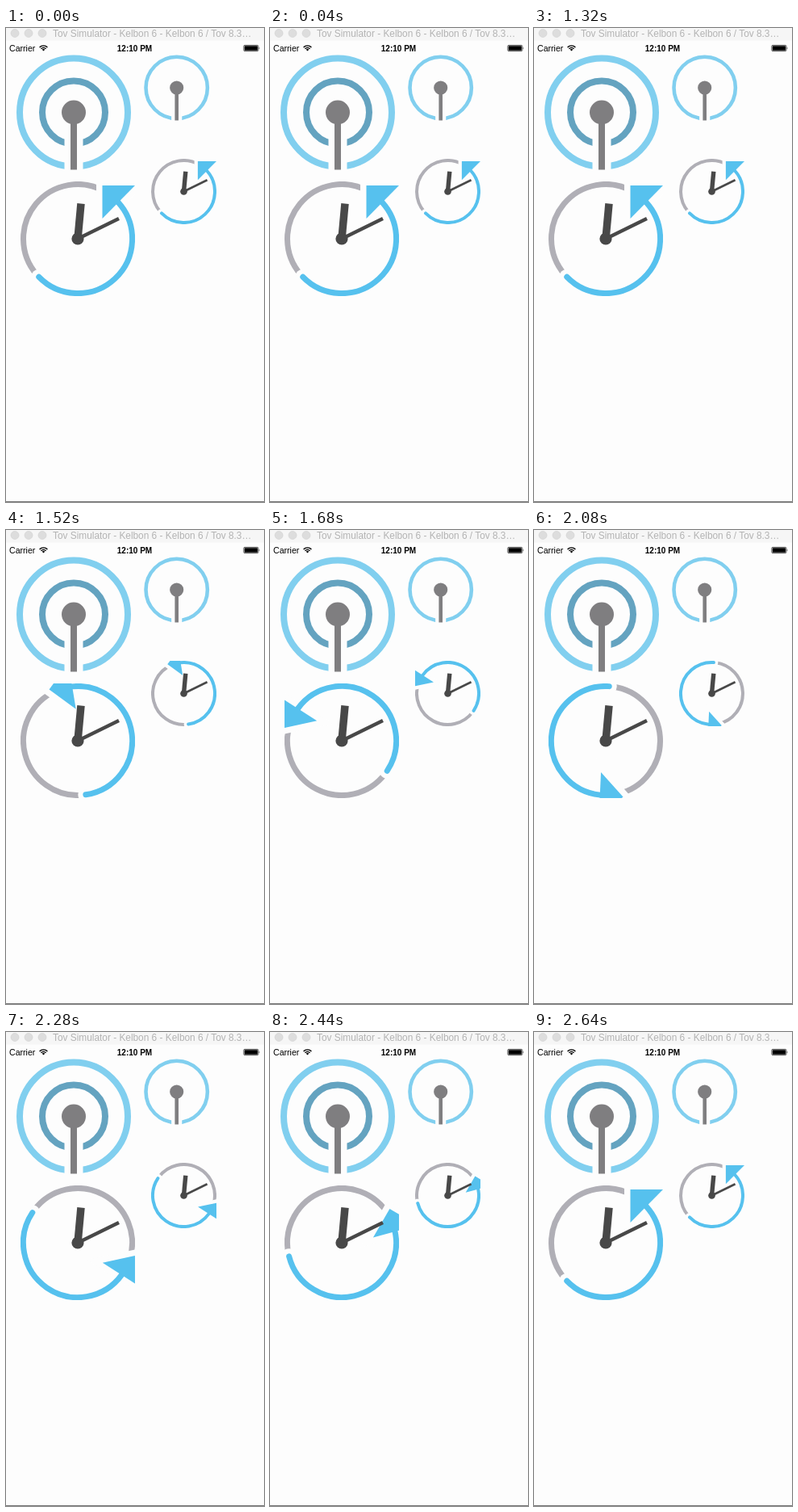
An HTML page for the animation above (2760 ms loop, 320 px wide and 587 px high).

```html
<!DOCTYPE html>
<html lang="en">
<head>
<meta charset="utf-8">
<title>Rotating clock icons</title>
<style>
  html, body { margin: 0; width: 100%; height: 100%; overflow: hidden; background: #fdfdfd; }
  svg { display: block; width: 320px; height: 587px; }
  text { font-family: "Liberation Sans", Arial, sans-serif; }
</style>
</head>
<body>
<svg id="stage" viewBox="0 0 320 587" xmlns="http://www.w3.org/2000/svg"></svg>
<script>
const LOOP = 2760, STEP = 40, START = 1340, SPIN = 1200;
const PAPER = '#fdfdfd', BLUE = '#56c1ee', GRAY = '#b0afb6', DARK = '#484848', STICK = '#7f7e80';
const stage = document.getElementById('stage');

const polar = (r, deg) => {
  const a = deg * Math.PI / 180;
  return [r * Math.cos(a), r * Math.sin(a)].map(v => v.toFixed(2)).join(' ');
};
const arc = (r, from, to) =>
  `M${polar(r, from)} A${r} ${r} 0 ${to - from > 180 ? 1 : 0} 1 ${polar(r, to)}`;
const ring = (r, color) =>
  `<circle r="${r}" fill="none" stroke="${color}" stroke-width="8"/>`;
const place = (x, y, scale, body) =>
  `<g transform="translate(${x} ${y}) scale(${scale})">${body}</g>`;

const antenna = inner => `
  ${ring(67, '#81cfef')}${inner ? ring(39, '#64a3c0') : ''}
  <rect x="-11.5" y="20" width="23" height="52" fill="${PAPER}"/>
  <rect x="-4" width="8" height="71" fill="${STICK}"/>
  <circle r="15" fill="${STICK}"/>`;

const TAIL = 135.6;
const arrow = 'M30.5 -66 H71 L30.5 -25 Z';
const [tailX, tailY] = polar(67.5, TAIL).split(' ');
const clock = `
  <g clip-path="url(#bounds)"><g class="spin">
    <path d="${arc(67.5, 139, 300)}" fill="none" stroke="${GRAY}" stroke-width="7"/>
    <path d="${arrow}" fill="${PAPER}" stroke="${PAPER}" stroke-width="15"/>
    <circle cx="${tailX}" cy="${tailY}" r="9.5" fill="${PAPER}"/>
    <path d="${arc(67.5, -42, TAIL)}" fill="none" stroke="${BLUE}" stroke-width="7" stroke-linecap="round"/>
    <path d="${arrow}" fill="${BLUE}"/>
  </g></g>
  <g stroke="${DARK}">
    <path d="M0 0 L4 -43.5" stroke-width="9.5"/>
    <path d="M0 0 L51 -25" stroke-width="4.4"/>
  </g>
  <circle r="7.6" fill="${DARK}"/>`;

const windowBar = `
  <rect width="320" height="15.5" fill="#f6f6f6"/>
  ${[11, 28, 45].map(x =>
    `<circle cx="${x}" cy="6.5" r="5" fill="#dddddd" stroke="#d0d0d0" stroke-width=".6"/>`).join('')}
  <text x="58" y="11" font-size="11.86" fill="#b3b3b3">Tov Simulator - Kelbon 6 - Kelbon 6 / Tov 8.3…</text>`;

const statusBar = `
  <text x="4" y="29" font-size="10.6">Carrier</text>
  <g transform="translate(46.5 28.6)" fill="none" stroke="#000" stroke-width="1.4">
    <path d="${arc(6.7, -137, -43)}"/><path d="${arc(4.2, -137, -43)}"/>
    <path d="M0 0 L-1.8 -1.9 A2.6 2.6 0 0 1 1.8 -1.9 Z" fill="#000" stroke="none"/>
  </g>
  <text x="159.5" y="29" font-size="10" font-weight="bold" text-anchor="middle">12:10 PM</text>
  <rect x="294.9" y="21.4" width="18" height="7.2" rx="1.2" fill="none" stroke="#000" stroke-width=".7"/>
  <rect x="295.8" y="22.3" width="16.2" height="5.4" rx=".5"/>
  <path d="M313.7 23.6 q1.5 1.4 0 2.8 Z"/>`;

stage.innerHTML = `
  <clipPath id="bounds"><rect x="-71" y="-71" width="142" height="142"/></clipPath>
  <rect width="320" height="587" fill="${PAPER}"/>
  ${windowBar}${statusBar}
  ${place(84, 104.5, 1, antenna(true))}
  ${place(211.7, 74, 0.57, antenna(false))}
  ${place(89, 261, 1, clock)}
  ${place(220.5, 202.5, 0.57, clock)}
  <rect y="586" width="320" height="1" fill="#777"/>`;

const spinners = stage.querySelectorAll('.spin');

function render(time) {
  const t = Math.floor(time % LOOP / STEP) * STEP;
  const progress = Math.min(1, Math.max(0, (t - START) / SPIN));
  for (const s of spinners) s.setAttribute('transform', `rotate(${-360 * progress})`);
}

const origin = performance.now();
function tick() {
  render(performance.now() - origin);
  requestAnimationFrame(tick);
}
tick();
</script>
</body>
</html>
```
